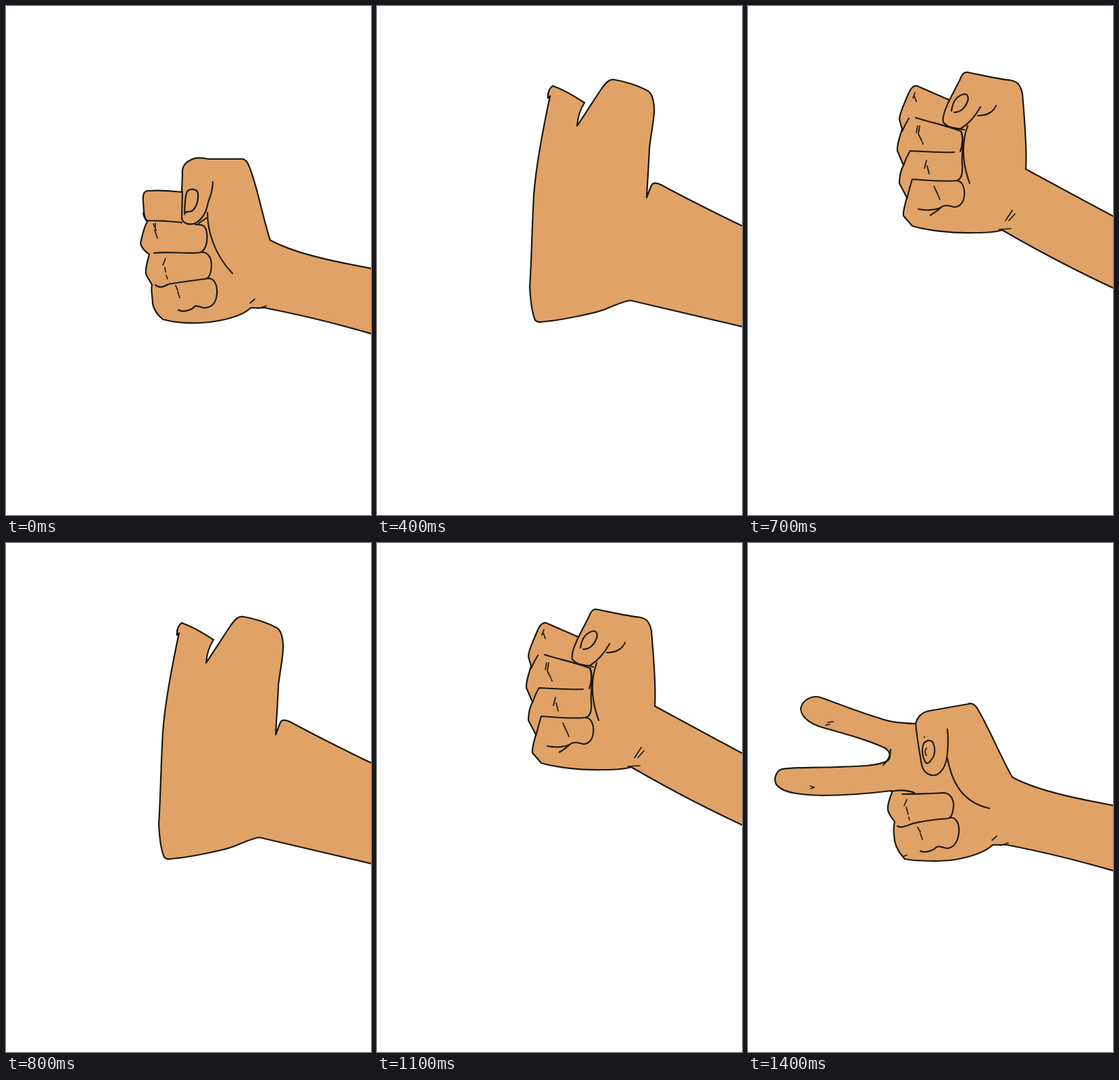
An HTML page that plays this animation: 540 px wide and 752 px high, repeating every 3400 ms.

```html
<!DOCTYPE html>
<html lang="en">
<head>
<meta charset="utf-8">
<title>Hand game</title>
<style>
  html, body { margin: 0; width: 100%; height: 100%; overflow: hidden; background: #fff; }
  svg { display: block; width: 100%; height: 100%; }
  path { fill: none; stroke: #1a170a; stroke-width: 2.1; stroke-linecap: round; stroke-linejoin: round; }
  .skin { fill: #e0a267; stroke-width: 2.2; }
  .fine path { stroke-width: 1.7; }

  /* Each pose is visible for one 100 ms slot of the 3.4 s loop. */
  .slot {
    visibility: hidden;
    animation: flash 3.4s step-end calc(var(--i) * 100ms) infinite;
  }
  .hold { visibility: hidden; animation: hold 3.4s step-end infinite; }
  @keyframes flash {
    0% { visibility: visible; }
    2.9415%, 100% { visibility: hidden; }
  }
  @keyframes hold {
    0% { visibility: hidden; }
    41.1764%, 100% { visibility: visible; }
  }
</style>
</head>
<body>
<svg viewBox="0 0 540 752" preserveAspectRatio="none">
  <defs>
    <g id="low">
      <path class="skin" d="M580 395C490 379 430 367 391 346C383 325 373 272 362 243C358 231 355 227 350 226L300 226C290 224 281 223 272 228C264 232 260 239 261 248L260 275C245 273 225 272 209 273C203 274 202 281 203 290L204 305C205 312 206 315 209 319C203 328 202 340 199 350C200 358 206 362 212 367C210 375 206 385 207 395C209 402 213 406 216 412C214 420 217 430 217 440C219 450 226 458 232 463C250 468 270 469 290 468C320 466 350 458 362 446L383 446C430 455 490 468 580 496"/>
      <path d="M261 274L260 314C262 322 272 324 280 321C292 314 297 303 299 290C303 280 306 270 306 260M264 308C265 295 264 282 268 274C272 269 282 270 284 276C285 290 281 298 275 303C270 305 266 302 264 308"/>
      <path d="M203 306Q204 314 209 317C225 317 245 318 260 320M280 323C292 322 296 326 297 335C299 350 295 360 288 364C270 367 240 362 219 365M285 321L297 313M288 364C298 362 304 372 304 382C304 395 300 402 296 403C275 406 250 409 240 411C232 416 225 416 221 412"/>
      <path d="M296 403C308 400 313 412 312 425C311 440 304 446 292 446C280 442 280 442 276 447C268 451 260 452 255 449M298 305C298 330 307 366 335 395"/>
      <g class="fine">
        <path d="M218 322L222 331M220 331L224 343M221 321V326M236 373L232 383M235 386L236 393M237 398L239 403M251 413L254 420M254 422L257 431M361 439L368 433M373 447L385 443"/>
      </g>
    </g>

    <g id="mid">
      <path class="skin" d="M580 369C495 349 440 333 400 318C393 285 380 230 369 192C345 189 320 188 305 184C290 182 284 186 280 195C276 205 277 220 274 236C255 229 235 229 217 226C208 228 204 240 205 255L208 268C203 275 198 283 199 292C200 305 207 312 209 320C204 330 201 340 203 350C205 357 211 361 215 366C213 380 213 395 219 407L231 420C250 424 275 426 297 426C325 425 350 416 361 414C400 425 480 450 580 482"/>
      <path d="M274 236C269 248 268 262 271 269C279 276 290 273 297 270C308 259 316 243 316 224M273 240C276 232 282 224 288 222C294 222 294 228 293 234C290 245 286 252 282 256C283 250 277 247 274 243"/>
      <path d="M204 277Q207 270 214 271C235 273 270 277 298 278C300 290 301 305 299 317C280 320 240 318 222 317C216 315 213 311 212 307M300 318C302 335 304 355 297 362C270 364 235 363 219 365L213 358"/>
      <path d="M297 361C306 364 309 375 306 388C302 398 295 400 288 400C280 402 275 400 271 404C262 408 250 409 243 406M302 262C298 290 300 325 308 345C313 355 318 360 326 365M276 274Q289 274 298 284"/>
      <g class="fine">
        <path d="M361 414C375 410 385 402 391 389M366 415Q381 411 388 401M221 281L224 291M222 292L225 298M226 289L230 303M239 329L233 341M237 337L242 349M248 374L251 380M253 377L256 386M259 380L261 384M297 422L300 426"/>
      </g>
    </g>

    <g id="high">
      <path class="skin" d="M600 343L411 241C413 215 409 165 406 130C403 115 398 112 390 110C370 108 345 102 325 98C319 97 316 102 313 110L298 139C283 132 265 125 250 118C243 117 239 125 235 135C230 148 224 158 224 168L228 182C224 195 220 205 221 214L230 235C225 245 224 255 224 262L235 283C232 295 229 303 230 310L243 325C262 331 300 336 335 335C355 335 370 333 376 331C430 362 490 395 600 444"/>
      <path d="M298 139C293 150 287 163 289 172C296 180 305 182 315 181C325 175 335 165 344 149M340 162C355 162 364 155 367 147M301 155C303 140 310 132 320 130C326 130 327 137 324 143C320 152 312 158 305 157"/>
      <path d="M238 166Q233 174 228 185M248 165C270 172 295 177 315 185C318 192 318 205 314 215M305 216C280 217 260 215 240 214C236 220 232 230 230 236M316 186C321 205 315 220 317 235C318 250 314 257 308 258C285 260 262 257 243 256C240 265 237 278 235 285"/>
      <path d="M308 258C318 258 321 270 320 280C319 292 312 297 305 297C298 295 292 293 286 297C280 301 265 303 252 300M286 297Q280 303 270 309M325 177C315 205 318 235 328 262M300 179L320 183"/>
      <g class="fine">
        <path d="M247 128L244 136M246 133L249 141M251 177L249 187M254 177L252 189L257 199M258 201L259 204M264 228L261 240M265 236L268 248M275 266L279 275L278 272L284 286M391 302L381 317M395 307L386 317M371 330L389 329"/>
      </g>
    </g>

    <g id="smear">
      <path class="skin" d="M580 344C500 306 455 283 420 264C412 260 408 261 406 265C403 272 401 278 399 283C400 262 402 235 403 210C405 190 411 165 410 150C409 135 406 128 400 125C385 117 365 111 352 109C344 107 339 113 333 121C320 140 308 160 296 177C297 165 301 152 307 143C295 135 280 125 260 118C256 120 252 128 253 136L256 133C246 180 235 235 232 280C229 330 229 370 226 415C227 435 230 455 234 464C237 468 242 467 250 466C280 463 330 452 340 447C355 441 365 436 375 435L580 483"/>
    </g>

    <g id="scissors">
      <path class="skin" d="M580 395C490 379 430 367 391 346C372 312 355 270 339 244C334 237 330 236 325 238L268 248C257 250 251 256 248 267C230 266 210 265 195 259C165 250 140 240 110 229C95 223 80 232 78 245C79 258 92 266 105 271C140 281 175 290 203 303C210 308 213 317 206 322C190 330 160 330 130 331C100 332 65 331 50 334C40 338 38 350 42 357C52 370 80 372 110 373C145 373 180 370 212 366L213 369C209 378 206 386 207 395C209 402 213 406 217 412C214 422 216 431 217 440C219 452 226 460 232 467C250 470 285 471 305 468C330 464 352 456 362 446L383 446C430 455 490 468 580 496"/>
      <path d="M211 305C211 312 209 320 200 328M248 266C250 290 254 310 257 328C260 340 270 346 280 342C290 336 294 325 295 310C296 300 296 285 295 275M262 323C257 314 257 302 260 296C264 291 272 290 274 296C278 304 276 315 272 319C268 326 264 327 262 323"/>
      <path d="M212 367Q230 363 246 369M228 371C250 371 275 370 290 369C300 370 305 380 304 390C303 400 300 406 296 407C275 408 255 412 245 414C235 418 225 422 221 418M295 318C300 345 312 382 357 392"/>
      <path d="M298 406C308 404 313 415 312 428C310 445 302 451 294 451C285 449 280 446 276 452C268 456 260 458 255 455"/>
      <g class="fine">
        <path d="M261 286V287M264 303Q260 308 264 314M235 379L231 388M234 390L237 401M238 405L239 409M251 420L255 427M255 429L258 438M118 265L126 264M115 269L121 268M92 359L98 361L93 363M230 463L235 461M361 439L368 433M373 447L385 443"/>
      </g>
    </g>

    <!-- Top of the swing: the raised fist turned a little about the elbow. -->
    <g id="peak"><use href="#high" transform="rotate(1.6 640 400)"/></g>
  </defs>

  <use class="slot" style="--i:0" href="#low"/>
  <use class="slot" style="--i:1" href="#mid"/>
  <use class="slot" style="--i:2" href="#high"/>
  <use class="slot" style="--i:3" href="#peak"/>
  <use class="slot" style="--i:4" href="#smear"/>

  <use class="slot" style="--i:5" href="#low"/>
  <use class="slot" style="--i:6" href="#mid"/>
  <use class="slot" style="--i:7" href="#high"/>
  <use class="slot" style="--i:8" href="#smear"/>

  <use class="slot" style="--i:9" href="#low"/>
  <use class="slot" style="--i:10" href="#mid"/>
  <use class="slot" style="--i:11" href="#high"/>
  <use class="slot" style="--i:12" href="#peak"/>
  <use class="slot" style="--i:13" href="#smear"/>

  <use class="hold" href="#scissors"/>
</svg>
</body>
</html>
```
